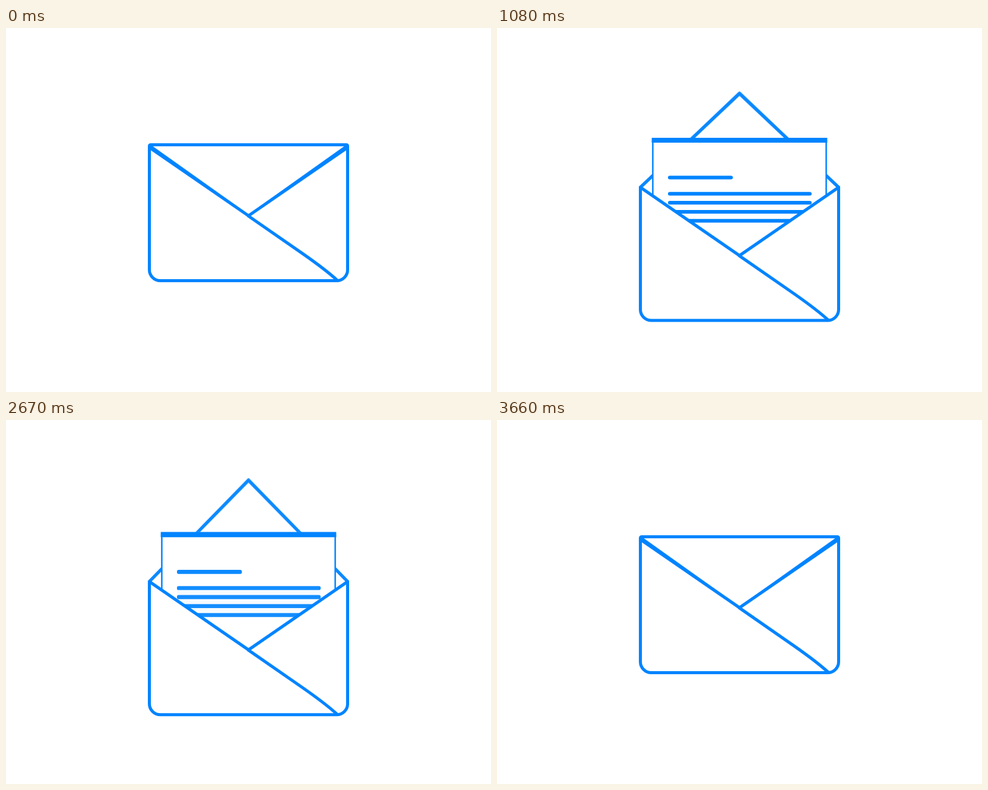
Recreate the animation shown at these times as an HTML page with a canvas. Size 800 by 600 pixels, loop 4140 ms.

```html
<!DOCTYPE html>
<html lang="en">
<head>
<meta charset="utf-8">
<title>Envelope</title>
<style>
  html, body { margin: 0; width: 100%; height: 100%; overflow: hidden; background: #fff; }
  canvas { display: block; width: 800px; height: 600px; }
</style>
</head>
<body>
<canvas id="stage" width="800" height="600"></canvas>
<script>
const ctx = document.getElementById('stage').getContext('2d');
const BLUE = '#0084ff', LOOP = 4140, STEP = 30;

const clamp = p => Math.min(1, Math.max(0, p));
const sine = p => (1 - Math.cos(Math.PI * p)) / 2;
const outQuad = p => 1 - (1 - clamp(p)) ** 2;

// Each key: [time, value, power]; a power below 1 makes the arrival softer.
function track(keys, t) {
  let [from, value] = keys[0];
  for (const [to, next, power = 1] of keys.slice(1)) {
    if (t <= from) break;
    value += (next - value) * sine(clamp((t - from) / (to - from)) ** power);
    if (t < to) break;
    from = to;
  }
  return value;
}

const SHIFT = [[0, 0], [360, -11], [880, 72], [1410, 60, .67], [2370, 60], [2805, 72], [3310, -11], [3680, 0]];
const FLAP = [[0, 115], [360, 155], [880, -179], [1410, -133.5, .67], [2370, -133.5], [2825, -179], [3310, 155], [3680, 115]];
const LETTER = [[538, 320], [1055, 115.5, .8], [2740, 115.5], [3260, 320]];

// Burst strokes: angle in degrees for the left and right side, reach in px
const SPARKS = [[23.5, 25, 215], [37.3, 38.8, 154], [10.3, 11.6, 154]];

function stroke(width, draw) {
  ctx.lineWidth = width;
  ctx.beginPath();
  draw();
  ctx.stroke();
}

function line(x1, y1, x2, y2, width) {
  stroke(width, () => { ctx.moveTo(x1, y1); ctx.lineTo(x2, y2); });
}

function flapEdges(inset, y, h) {
  ctx.moveTo(inset, y);
  ctx.lineTo(400, y + h);
  ctx.lineTo(800 - inset, y);
}

// The open flap is drawn as two near poses, which smears it while it moves.
function drawOpenFlap(t) {
  const poses = [-6, 6].map(dt => track(FLAP, t + dt));
  ctx.globalAlpha = 1 - .4 * clamp(Math.abs(poses[1] - poses[0]) / 3);
  for (const h of poses) stroke(5, () => flapEdges(236.5, 197, h));
  ctx.globalAlpha = 1;
}

function drawClosedFlap(h) {
  stroke(5, () => {
    flapEdges(238, 195, h);
    ctx.fill();
  });
  stroke(5, () => {
    ctx.moveTo(236.5, 200);
    ctx.lineTo(236.5, 195);
    ctx.quadraticCurveTo(236.5, 192.5, 239, 192.5);
    ctx.lineTo(561, 192.5);
    ctx.quadraticCurveTo(563.5, 192.5, 563.5, 195);
    ctx.lineTo(563.5, 200);
  });
}

function drawFront() {
  stroke(5, () => {
    ctx.moveTo(236.5, 197);
    ctx.lineTo(236.5, 398.5);
    ctx.arcTo(236.5, 416.5, 254.5, 416.5, 18);
    ctx.lineTo(545.5, 416.5);
    ctx.arcTo(563.5, 416.5, 563.5, 398.5, 18);
    ctx.lineTo(563.5, 197);
    ctx.lineTo(400, 309.5);
    ctx.closePath();
    ctx.fill();
  });
  stroke(5, () => {
    ctx.moveTo(400, 310);
    ctx.lineTo(490, 372.4);
    ctx.quadraticCurveTo(528, 399, 546.5, 416);
  });
}

// Fast movement (smear in px) makes the letter's bars taller and fainter.
function drawLetter(y, smear) {
  const k = smear / 5, bottom = 400;

  function bar(x, middle, width, height, radius, alpha) {
    ctx.globalAlpha = alpha;
    ctx.beginPath();
    ctx.roundRect(x, middle - height / 2, width, height, radius);
    ctx.fill();
  }

  ctx.fillRect(256, y, 288, bottom - y);
  for (const x of [257, 543]) line(x, y + 4, x, bottom, 2.5);

  ctx.fillStyle = BLUE;
  bar(255.5, y + 4, 289, 8 + smear, 0, 1 - .55 * k);
  bar(255.5, y + 4, 289, 8 - smear / 2, 0, 1 - .55 * k);
  bar(282, y + 65.5, 107, 6 + smear, 3 * (1 - k), 1 - .5 * k);
  bar(282, y + 114.4, 237, 50 + smear, 0, .35 * k);
  for (let i = 0; i < 4; i++) {
    bar(282, y + 92.2 + i * 14.8, 237, 6 + smear, 3 * (1 - k), 1 - .75 * k);
  }
  ctx.globalAlpha = 1;
  ctx.fillStyle = '#fff';
}

function drawSparks(t) {
  const p = (t - 600) / 441, lag = .0715;
  if (p <= 0 || p >= 1 + lag) return;
  const head = outQuad(p), tail = outQuad(p - lag);
  for (const [left, right, reach] of SPARKS) {
    const a = 40 + tail * (reach - 40), b = 40 + head * (reach - 40);
    for (const [x, y, angle, side] of [[237, 251, left, -1], [562, 249, right, 1]]) {
      const c = side * Math.cos(angle * Math.PI / 180), s = Math.sin(angle * Math.PI / 180);
      line(x + a * c, y - a * s, x + b * c, y - b * s, 5.5);
    }
  }
}

function render(t) {
  ctx.fillStyle = '#fff';
  ctx.strokeStyle = BLUE;
  ctx.lineCap = ctx.lineJoin = 'round';
  ctx.fillRect(0, 0, 800, 600);
  drawSparks(t);

  const shift = track(SHIFT, t), flap = track(FLAP, t), letter = track(LETTER, t);
  const travel = Math.abs(letter + shift - track(LETTER, t - 14) - track(SHIFT, t - 14));
  const smear = travel < .5 ? 0 : Math.min(5, travel);

  ctx.save();
  ctx.translate(0, shift);
  if (flap <= 0) drawOpenFlap(t);
  if (letter < 310) drawLetter(letter, smear);
  if (flap > 0) drawClosedFlap(flap);
  drawFront();
  ctx.restore();
}

const start = performance.now();
function tick() {
  const t = (performance.now() - start) % LOOP;
  render(Math.floor(t / STEP) * STEP);
  requestAnimationFrame(tick);
}
tick();
</script>
</body>
</html>
```
